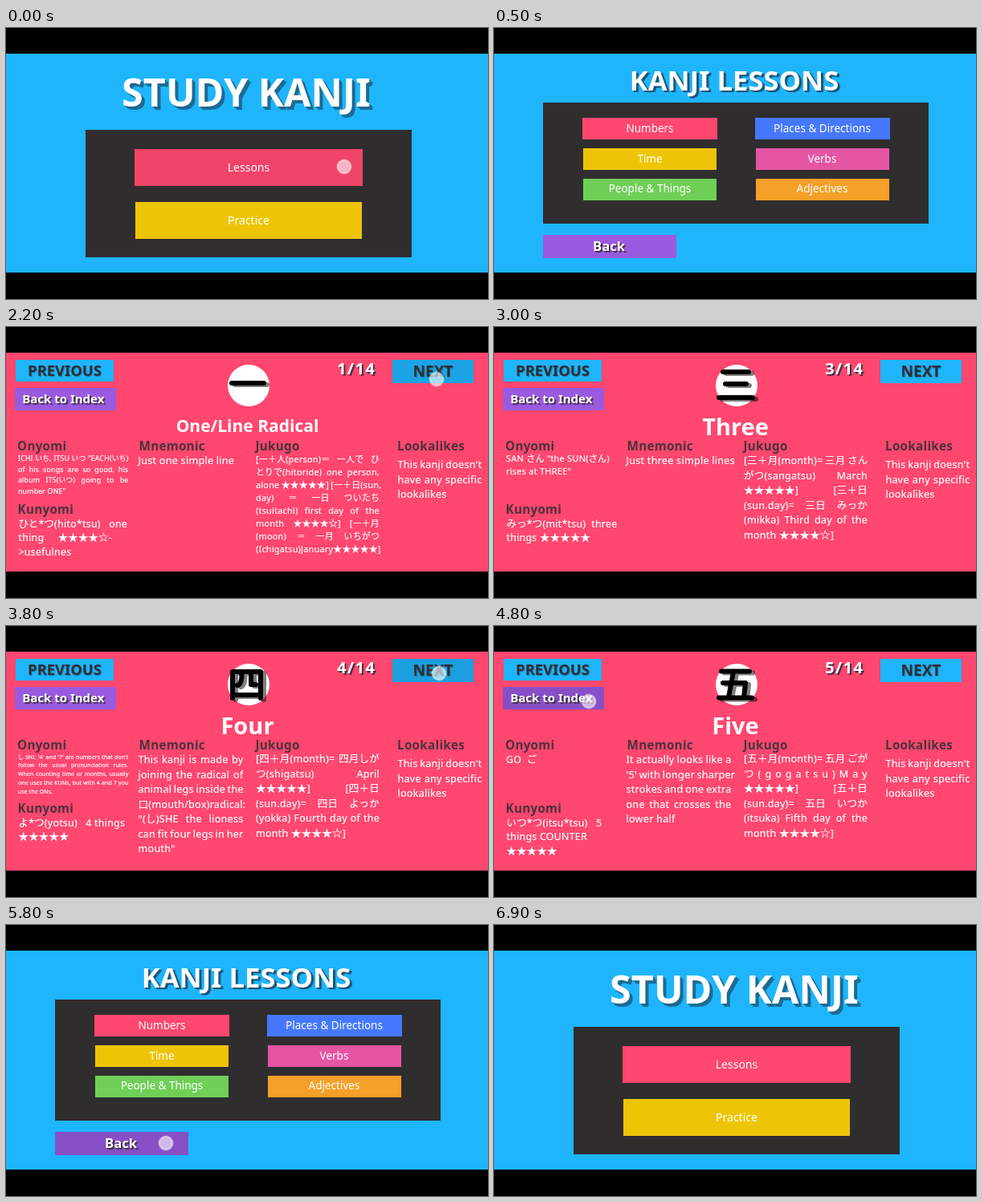
An HTML page for the animation above (7100 ms loop, 600x338 px).

```html
<!DOCTYPE html>
<html lang="ja">
<head>
<meta charset="utf-8">
<title>Study Kanji</title>
<style>
html, body { margin: 0; width: 100%; height: 100%; overflow: hidden; background: #000; }
#stage { position: relative; width: 600px; height: 338px; overflow: hidden; background: #000;
  font-family: "Noto Sans", "Noto Sans CJK JP", sans-serif; color: #fff; }
#stage div { position: absolute; white-space: pre; }
.scene { left: 0; top: 32px; width: 600px; height: 273px; visibility: hidden; }
.scene > * { margin-top: -32px; }
.box, .text { display: flex; align-items: center; justify-content: center; line-height: 1; }
.box { --press: 0; background-image: linear-gradient(rgb(0 0 0 / var(--press)), rgb(0 0 0 / var(--press))); }
.line { display: flex; letter-spacing: .02em; -webkit-text-stroke: .2px; }
.spread { justify-content: space-between; gap: .2em; }
.bold { font-weight: 700; }
.dark { color: #302d2f; text-shadow: 1px 1px 1px rgba(0, 0, 0, .3); }
.head { font-weight: 600; color: #4a333c; letter-spacing: .02em; }
.shade { text-shadow: 2px 2px 1px #403040; }
.title { text-shadow: 2px 2px 0 #1c6b93, 4px 4px 0 #1c6b93; }
.subtitle { text-shadow: 2px 2px 0 #1b5676, 3px 2px 1px #1b5676; }
svg { position: absolute; left: 0; top: 0; overflow: visible; }
#dot { width: 18px; height: 18px; margin: -9px; border-radius: 50%; visibility: hidden;
  background: radial-gradient(rgba(255, 255, 255, .6) 45%, rgba(255, 255, 255, .75) 75%, rgba(255, 255, 255, .3) 100%);
  box-shadow: 0 0 2px rgba(255, 255, 255, .5); }
</style>
</head>
<body>
<div id="stage"></div>
<script>
const LOOP = 7100, TICK = 100, PRESS_TIME = 250;
const SKY = '#1eb5fd', PINK = '#ff476f', DARK = '#302d2f', YELLOW = '#eec506', PURPLE = '#9a5ae0';
const stage = document.getElementById('stage');

function add(parent, cls, style, text = '') {
  const el = document.createElement('div');
  el.className = cls;
  for (const key in style) el.style[key] = typeof style[key] === 'number' ? style[key] + 'px' : style[key];
  el.textContent = text;
  parent.append(el);
  return el;
}

const scene = color => add(stage, 'scene', { backgroundColor: color });

// Box given by its edges, with a centred label.
const box = (parent, x1, y1, x2, y2, color, label = '', size = 14, cls = '') =>
  add(parent, 'box ' + cls, { left: x1, top: y1, width: x2 - x1, height: y2 - y1, backgroundColor: color, fontSize: size }, label);

const centred = (parent, x, y, size, text, cls) =>
  add(parent, 'text ' + cls, { left: x - 250, top: y - 40, width: 500, height: 80, fontSize: size }, text);

const heading = (parent, x, y, text) =>
  add(parent, 'head', { left: x, top: y - 10, lineHeight: '20px', fontSize: 15.2 }, text);

// Lines are split at "|"; with a width all but the last are justified.
function paragraph(parent, { x, y, w = 0, step = 18.5, size = 12.6 }, text) {
  const lines = text.split('|');
  lines.forEach((line, i) => {
    const spread = w && i < lines.length - 1;
    const style = { left: x, top: y + i * step - 10, lineHeight: '20px', fontSize: size };
    if (spread) style.width = w;
    const el = add(parent, spread ? 'line spread' : 'line', style, spread ? '' : line);
    if (spread) for (const word of line.split(' ')) {
      el.append(Object.assign(document.createElement('span'), { textContent: word }));
    }
  });
}

function makeMenu() {
  const s = scene(SKY);
  centred(s, 299, 79, 48.5, 'STUDY KANJI', 'bold title');
  box(s, 99, 126.5, 504.5, 286, DARK);
  const lessons = box(s, 160, 151, 444, 197, PINK, 'Lessons');
  box(s, 161, 216.5, 443, 263, YELLOW, 'Practice');
  return { s, lessons };
}

function makeIndex() {
  const s = scene(SKY);
  centred(s, 299, 65.5, 34.6, 'KANJI LESSONS', 'bold subtitle');
  box(s, 61, 92.5, 540.5, 244, DARK);
  const item = (x, y, color, label, grow = 0) =>
    box(s, x - grow, y, x + 166 + grow, y + 27, color, label, 13.5);
  const numbers = item(111, 112, PINK, 'Numbers', 1);
  item(111, 150, YELLOW, 'Time');
  item(111, 187.5, '#6fcf57', 'People & Things');
  item(325.5, 112, '#4678ff', 'Places & Directions', 1);
  item(325.5, 150, '#e555a3', 'Verbs');
  item(325.5, 187.5, '#f5a028', 'Adjectives');
  const back = box(s, 61, 257.5, 227, 286.5, PURPLE, 'Back', 16.6, 'bold shade');
  back.style.textIndent = '-2px';
  return { s, numbers, back };
}

function makeCard(number, card) {
  const s = scene(PINK);
  box(s, 12, 41, 134, 68, SKY, 'PREVIOUS', 18.4, 'bold dark');
  const index = box(s, 11, 76, 136.5, 103.5, PURPLE, 'Back to Index', 15, 'bold shade');
  index.style.textIndent = '-5px';
  const next = box(s, 481, 41, 582, 69.5, SKY, 'NEXT', 19, 'bold dark');
  const count = centred(s, 436, 51, 20.4, number + '/14', 'bold shade');
  count.style.letterSpacing = '1.2px';

  s.insertAdjacentHTML('beforeend', `<svg width="600" height="338" fill="none" stroke-width="6"
    stroke-linecap="round" stroke-linejoin="round"><circle cx="302" cy="73" r="26" fill="#fff"/>
    <path d="${card.glyph}" stroke="#000" opacity=".5" transform="translate(4 2)"/>
    <path d="${card.glyph}" stroke="#000"/></svg>`);
  centred(s, 300.5, 123.5, card.titleSize || 29, card.title, 'bold');

  heading(s, 14, 147.5, 'Onyomi');
  heading(s, 14.5, 226.5, 'Kunyomi');
  heading(s, 165.5, 147.5, 'Mnemonic');
  heading(s, 310.5, 147.5, 'Jukugo');
  heading(s, 487, 147.5, 'Lookalikes');
  paragraph(s, { x: 15, y: 164, w: 137.5, step: 13.6, size: 8.8, ...card.onFit }, card.on);
  paragraph(s, { x: 15.5, y: 245.5, step: 17.5, size: 12.4 }, card.kun);
  paragraph(s, { x: 164.5, y: 167, w: 131 }, card.mnemonic);
  paragraph(s, { x: 311, y: 166, w: 154, size: 12.5, ...card.jukugoFit }, card.jukugo);
  paragraph(s, { x: 487.5, y: 172, w: 105 }, "This kanji doesn't|have any specific|lookalikes");
  return { s, index, next };
}

const SMALL = { y: 164.5, step: 16, size: 10.9 };
const cards = [
  { title: 'One/Line Radical', titleSize: 21, glyph: 'M281 70H321',
    on: 'ICHI いち, ITSU いつ "EACH(いち)|of his songs are so good, his|album ITS(いつ) going to be|number ONE"',
    kun: 'ひと*つ(hito*tsu)   one|thing     ★★★★☆-|>usefulnes',
    mnemonic: 'Just one simple line', jukugoFit: SMALL,
    jukugo: '[一＋人(person)＝ 一人で ひ|とりで(hitoride) one person,|alone ★★★★★] [一＋日(sun,|day) ＝ 一日 ついたち|(tsuitachi) first day of the|month ★★★★☆] [一＋月|(moon) ＝ 一月 いちがつ|(Ichigatsu)January★★★★★]' },
  { title: 'Two', glyph: 'M286 59H316M280 86H322',
    on: 'NI に "my KNEE(に) hurts|after TWO long runs"', onFit: { w: 0, size: 11, step: 16 },
    kun: 'ふた*つ(futa*tsu)  two|things ★★★★★',
    mnemonic: 'Just two simple lines', jukugoFit: SMALL,
    jukugo: '[二＋人(person)＝ 二人 ふ|たり(futari) two people|★★★★★] [二＋日(sun,|day) ＝ 二日 ふつか|(futsuka) second day of the|month ★★★★☆] [二＋月|(moon) ＝ 二月 にがつ|(nigatsu)February ★★★★★]' },
  { title: 'Three', glyph: 'M285 56H317M288 71H314M280 88H322',
    on: 'SAN さん "the SUN(さん)|rises at THREE"', onFit: { w: 0, size: 11, step: 16 },
    kun: 'みっ*つ(mit*tsu)  three|things ★★★★★',
    mnemonic: 'Just three simple lines', jukugoFit: { y: 167 },
    jukugo: '[三＋月(month)= 三月 さん|がつ(sangatsu) March|★★★★★] [三＋日|(sun.day)= 三日 みっか|(mikka) Third day of the|month ★★★★☆]' },
  { title: 'Four', glyph: 'M282 90V57H317V90M282 86H317M293.5 57Q294 73 288 74M305 57V73H311',
    on: "し SHI, '4' and '7' are numbers that don't|follow the usual pronunciation rules.|When counting time or months, usually|one uses the KUNs, but with 4 and 7 you|use the ONs.",
    onFit: { y: 163.5, step: 10.9, size: 6.9 },
    kun: 'よ*つ(yotsu)   4 things|★★★★★',
    mnemonic: 'This kanji is made by|joining the radical of|animal legs inside the|口(mouth/box)radical:|"(し)SHE the lioness|can fit four legs in her|mouth"',
    jukugo: '[四＋月(month)= 四月しが|つ(shigatsu) April|★★★★★] [四＋日|(sun.day)= 四日 よっか|(yokka) Fourth day of the|month ★★★★☆]' },
  { title: 'Five', glyph: 'M283 56.5H318M298 57L292 89M285 71H313L311 89M280 89.5H321',
    on: 'GO  ご', onFit: { y: 167, size: 12.3 },
    kun: 'いつ*つ(itsu*tsu)   5|things COUNTER|★★★★★',
    mnemonic: "It actually looks like a|'5' with longer sharper|strokes and one extra|one that crosses the|lower half",
    jukugo: '[五＋月(month)= 五月 ごが|つ ( g o g a t s u ) M a y|★★★★★] [五＋日|(sun.day)= 五日 いつか|(itsuka) Fifth day of the|month ★★★★☆]' },
].map((card, i) => makeCard(i + 1, card));

const menu = makeMenu(), index = makeIndex();
const dot = add(stage, '', {});
dot.id = 'dot';

// Each view: start time, scene, pressed button, press start, touch point.
const views = [
  [0, menu.s, menu.lessons, -50, 421, 173],
  [300, index.s, index.numbers, 1200, 256, 123.5],
  [1500, cards[0].s, cards[0].next, 2120, 535.5, 65],
  [2400, cards[1].s, cards[1].next, 2700, 537, 62],
  [3000, cards[2].s, cards[2].next, 3200, 538, 60],
  [3500, cards[3].s, cards[3].next, 3700, 539, 58.5],
  [4000, cards[4].s, cards[4].index, 4700, 118, 94],
  [5000, index.s, index.back, 5700, 199, 272],
  [6000, menu.s, null, LOOP, 0, 0],
];

function draw(now) {
  const t = Math.floor((now % LOOP) / TICK) * TICK;
  const [, shown, button, pressed, x, y] = views.findLast(view => view[0] <= t);
  for (const el of stage.querySelectorAll('.scene')) el.style.visibility = el === shown ? 'visible' : 'hidden';
  const age = t - pressed;
  const down = age >= 0 && age < PRESS_TIME;
  for (const view of views) view[2]?.style.setProperty('--press', 0);
  if (down) button.style.setProperty('--press', 0.12 * Math.min(1, age / 100));
  dot.style.visibility = down ? 'visible' : 'hidden';
  dot.style.left = x + 'px';
  dot.style.top = y + 'px';
}

function loop() {
  draw(performance.now());
  requestAnimationFrame(loop);
}
loop();
</script>
</body>
</html>
```
